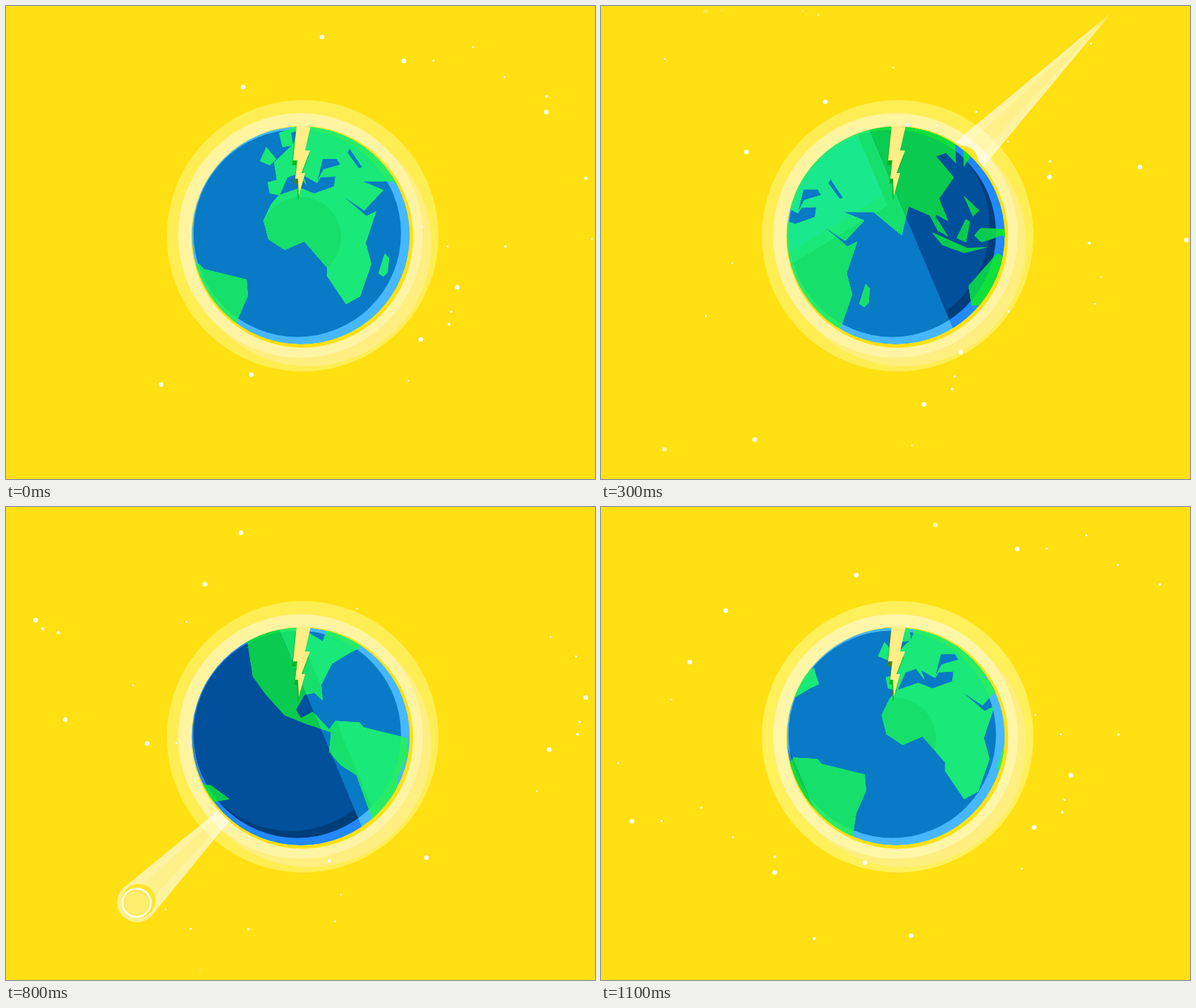
An HTML page for the animation above (1200 ms loop, 835 px wide and 671 px high).

```html
<!DOCTYPE html>
<html lang="en">
<head>
<meta charset="utf-8">
<title>Spinning globe</title>
<style>
  html, body { margin: 0; width: 100%; height: 100%; overflow: hidden; background: #ffe013; }
  svg { display: block; width: 835px; height: 671px; }
</style>
</head>
<body>
<svg id="stage" viewBox="0 0 835 671" xmlns="http://www.w3.org/2000/svg"></svg>
<script>
const LOOP = 1200, STEP = 100, UNITS = 21;

// Travel per unit of spin.
const MAP = { dx: -32.36, dy: 8.67 };
const STAR = { dx: -26, dy: 18.4 };
const COMET = { x: 687.7, y: 37.8, dx: -35.9, dy: 37.4 };
const NIGHT_DX = -32;

// Key points of each coast; seas inside a continent are cut out by the even-odd rule.
const COASTS = {
  eurafrica: `387,180 392,200 405,198 380,222 384,247 371,250 374,266 387,268 376,281 365,304 372,331 395,346
    423,334 455,371 455,383 482,423 502,412 518,366 510,336 525,291 511,298 478,270 508,290 535,261 506,249
    548,249 588,282 598,241 628,254 641,279 636,252 654,262 641,230 662,200 637,170 651,165 665,180 663,137
    652,108 640,40 425,60 408,172`,
  mediterranean: "388,268 399,243 414,238 426,254 421,240 441,251 446,243 467,242 465,256 437,266 417,258",
  blackSea: "441,249 449,217 469,217 474,225 450,232",
  caspian: "487,202 484,208 500,230 505,229",
  baltic: "404,180 413,177 407,198",
  britain: "369,200 383,217 374,226 360,220",
  madagascar: "537,351 543,358 541,378 535,384 528,379",
  japan: "662,116 679,135 689,165 676,185 675,140",
  philippines: "676,226 698,247 689,255",
  borneo: "679,259 685,263 679,292 666,286",
  sumatra: "635,254 654,284 641,276",
  java: "631,278 681,300 709,299 677,307 646,296",
  newGuinea: "691,282 700,272 743,273 770,293 747,297 731,282 701,292",
  australia: `748,300 761,320 777,344 772,377 761,395 749,397 741,384 704,381 687,382 683,354 701,333
    724,307 745,321`,
  americas: `798,11 795,68 803,119 821,144 848,174 878,186 914,198 911,226 928,245 950,259 980,343 1004,293
    1009,261 1023,229 1021,206 960,191 954,184 920,182 911,194 899,181 888,169 871,178 864,166 876,145
    890,142 902,153 900,131 915,101 943,84 956,78 949,55 930,61 918,26 902,69 884,58 858,21`
};
const BOLT = "412,170 432,170 424,205 431,205 419,237 424,237 415,270 414,245 410,245 413,219 407,219";
const BRIGHT_STARS = `640,399 564,78 448,44 336,115 588,473 220,537 348,523 697,-221 646,-148 406,-97
  960,240 278,-84`;

const points = text => text.trim().split(/\s+/).map(p => p.split(",").map(Number));
const mix = (a, b, s) => a + (b - a) * s;
const clamp = v => Math.max(0, Math.min(1, v));
const move = (x, y) => ({ transform: `translate(${x} ${y})` });
const set = (el, attrs) => { for (const key in attrs) el.setAttribute(key, attrs[key]); };
const show = (el, on) => set(el, { visibility: on ? "visible" : "hidden" });

function seeded(seed) {
  return () => (seed = seed * 16807 % 2147483647) / 2147483647;
}

// The map repeats after one full turn, so it is laid out three times.
const land = [-1, 0, 1].flatMap(turn => Object.values(COASTS).map(coast =>
  "M" + points(coast).map(([x, y]) =>
    [x - turn * UNITS * MAP.dx, y - turn * UNITS * MAP.dy].map(Math.round)).join(" ") + "Z")).join("");

// Steep band that borders day and night; x is measured at mid-globe.
const slant = (x0, x1) => `${x0 - 92},100 ${x1 - 92},100 ${x1 + 101},560 ${x0 + 101},560`;
const disc = (x, y, r, fill, more = "") => `<circle cx="${x}" cy="${y}" r="${r}" fill="${fill}" ${more}/>`;
const shadow = (fill, more = "") =>
  `<g ${more}><polygon points="${BOLT}" transform="translate(-1.5 7)" fill="${fill}"/></g>`;
const landPath = (fill, name = "") =>
  `<path class="land ${name}" d="${land}" fill="${fill}" fill-rule="evenodd"/>`;

function scene(c, tints = "") {
  return `${disc(418, 325.5, 154.5, c.rim)}
    <g clip-path="url(#inner)">${disc(413, 322.5, 148, c.edge)}${disc(404, 312.5, 147, c.sea)}</g>
    ${shadow(c.seaShadow)}${landPath(c.landRim)}
    <g clip-path="url(#inner)">${landPath(c.land, c.name)}<g clip-path="url(#landClip)">${tints}</g></g>
    ${shadow(c.landShadow, 'clip-path="url(#landClip)"')}`;
}

const day = { name: "day", rim: "#47b8ff", edge: "#097ac5", sea: "#097ac5", landRim: "#28ec66",
  land: "#1ae878", seaShadow: "#47801f", landShadow: "#0dba20" };
const night = { name: "night", rim: "#2289ff", edge: "#003e7a", sea: "#00509b", landRim: "#0fe03c",
  land: "#0acb4f", seaShadow: "#003a72", landShadow: "#06b41e" };

const dayTints = `
  <g id="slopeTint"><polygon points="200,391 640,122 640,560 200,560" fill="#1ae878"/>
    <polygon points="200,409 640,140 640,560 200,560" fill="#17df6b"/></g>
  <g id="discTint" fill="#17df6b"><circle cx="418" cy="328" r="57"/>
    <polygon points="200,330 385,330 385,520 200,520"/></g>
  <g class="night-shift" fill="#17df6b"><polygon points="${slant(581, 603)}"/>
    <polygon points="${slant(894, 922)}"/></g>`;

const stage = document.getElementById("stage");
stage.innerHTML = `
  <defs>
    <clipPath id="globe"><circle cx="418" cy="325.5" r="154.5"/></clipPath>
    <clipPath id="inner"><circle cx="413" cy="322.5" r="147"/></clipPath>
    <clipPath id="landClip"><path class="land" d="${land}" clip-rule="evenodd"/></clipPath>
    <clipPath id="nightClip"><polygon class="night-shift" points="${slant(601, 896)}"/></clipPath>
    <linearGradient id="fade" gradientUnits="userSpaceOnUse" x1="0" y1="0" x2="0" y2="671">
      <stop offset=".006" stop-color="#000"/><stop offset=".05" stop-color="#fff"/>
      <stop offset=".94" stop-color="#fff"/><stop offset=".98" stop-color="#000"/>
    </linearGradient>
    <mask id="fadeMask" maskUnits="userSpaceOnUse" x="0" y="0" width="835" height="671">
      <rect width="835" height="671" fill="url(#fade)"/></mask>
  </defs>
  <rect width="835" height="671" fill="#ffe013"/>
  ${disc(420.5, 326, 192.5, "", 'id="glow"')}
  ${disc(429.5, 337.5, 173.5, "#ffee80")}
  ${disc(417.5, 325.5, 173.5, "#fff6a8", 'id="ring"')}
  <g id="stars" fill="#fffef0"></g>
  <g mask="url(#fadeMask)"><g id="comet">
    <path id="tail" fill="#fff" fill-opacity=".5"/>
    <path id="streaks" fill="#fff" fill-opacity=".2"/>
    ${disc(3, -3, 24, "#ffe42c")}
    ${disc(0, 0, 20, "#ffe94a", 'stroke="#fffde6" stroke-width="3"')}
    ${disc(0, 0, 16.5, "#ffee70")}
  </g></g>
  ${disc(420, 327.5, 157.3, "#ffe013")}
  <g clip-path="url(#globe)">
    ${scene(day, dayTints)}
    <g clip-path="url(#nightClip)">${scene(night)}</g>
  </g>
  <polygon points="${BOLT}" fill="#ffee85"/>`;

const [glow, ring, comet, tail, streaks, slopeTint, discTint, starLayer] =
  ["glow", "ring", "comet", "tail", "streaks", "slopeTint", "discTint", "stars"]
    .map(id => document.getElementById(id));
const dayLand = stage.querySelector(".land.day");
const lands = stage.querySelectorAll(".land");
const nightShifts = stage.querySelectorAll(".night-shift");

// Every star has a follower that arrives at its starting place when the loop ends.
const stars = [];
function addStar(x, y, r) {
  for (const turn of [0, 1]) {
    const dot = document.createElementNS(stage.namespaceURI, "circle");
    set(dot, { r });
    starLayer.append(dot);
    stars.push({ dot, x: x - turn * UNITS * STAR.dx, y: y - turn * UNITS * STAR.dy });
  }
}
points(BRIGHT_STARS).forEach(([x, y]) => addStar(x, y, 3.3));
const random = seeded(77);
for (let i = 0; i < 22; i++) addStar(mix(220, 840, random()), mix(-100, 550, random()), mix(1.2, 2.3, random()));

function draw(time) {
  const step = Math.floor((time % LOOP) / STEP);
  // Two units a step, with one unit held back every fifth step.
  const u = 2 * step - Math.floor((step + 3) / 5);

  lands.forEach(el => set(el, move(u * MAP.dx, u * MAP.dy)));
  nightShifts.forEach(el => set(el, move(u * NIGHT_DX, 0)));

  const sloped = u >= 2 && u <= 11;
  show(slopeTint, sloped);
  show(discTint, !sloped);
  set(dayLand, { fill: sloped ? "#1ae88c" : day.land });

  const pulse = 0.5 + 0.5 * Math.cos(2 * Math.PI * (u + 1) / 7);
  set(glow, { fill: `rgb(255,${mix(230, 240, pulse)},${mix(45, 92, pulse)})` });
  set(ring, { opacity: mix(0.55, 1, pulse) });

  for (const { dot, x, y } of stars) {
    const cy = y + u * STAR.dy;
    set(dot, { cx: x + u * STAR.dx, cy, opacity: clamp(Math.min(cy / 40 + 0.05, (660 - cy) / 45)) });
  }

  show(comet, u > 0 && u < 20);
  set(comet, move(COMET.x + u * COMET.dx, COMET.y + u * COMET.dy));
  const reach = 228 - 2 * u, tip = `L${reach},${-reach}`;
  set(tail, { d: `M-20,-20 ${tip} L20,20 A28.3 28.3 0 0 1 -20,-20Z` });
  set(streaks, { d: `M-20,-20 ${tip} L-9,-9Z M20,20 ${tip} L9,9Z` });
}

function tick() {
  draw(performance.now());
  requestAnimationFrame(tick);
}
tick();
</script>
</body>
</html>
```
